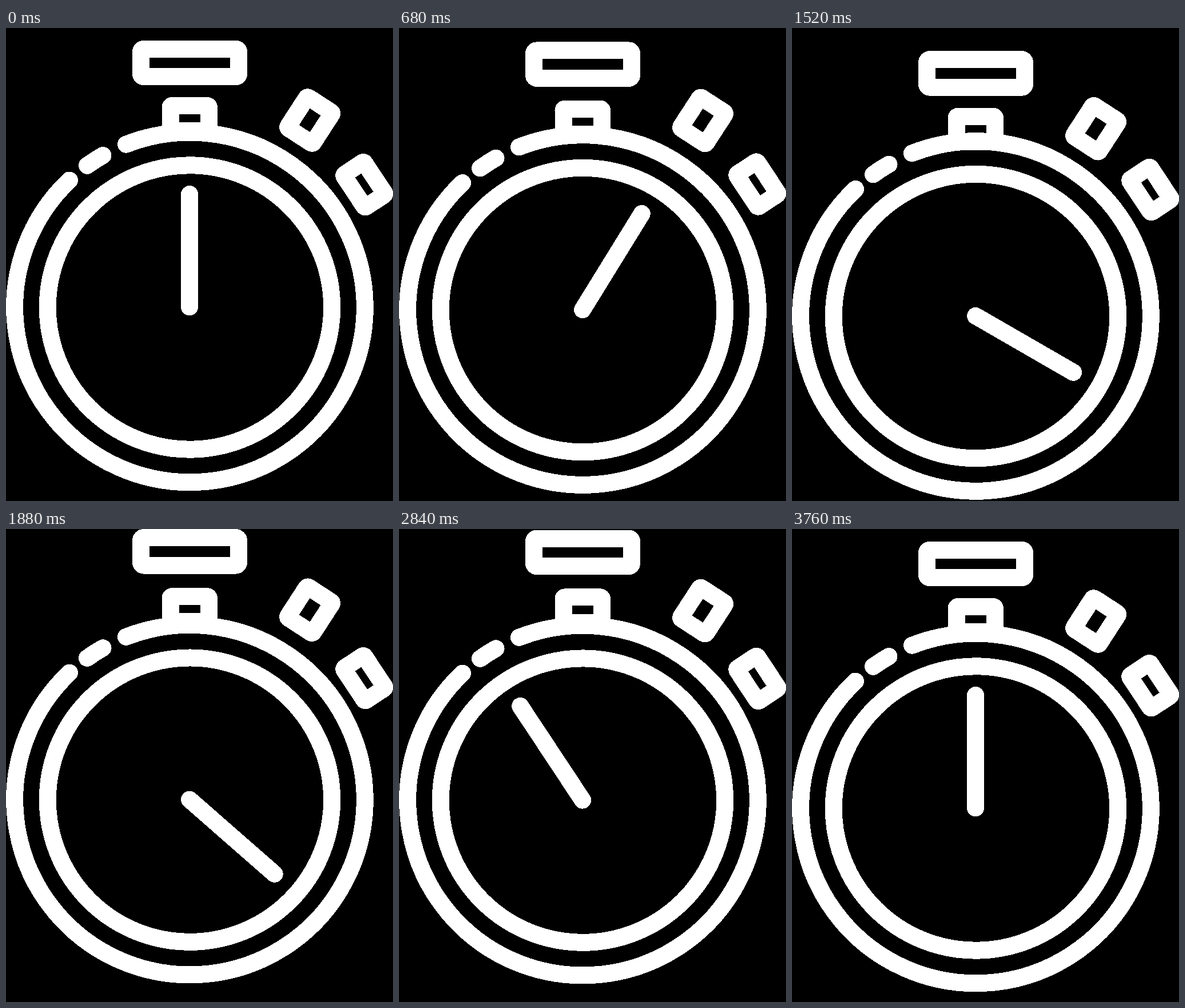
Write an HTML page that moves like this. It is 677 px wide and 828 px high and loops after 5040 ms.

```html
<!DOCTYPE html>
<html lang="en">
<head>
<meta charset="utf-8">
<title>Stopwatch</title>
<style>
  html, body { margin: 0; width: 100%; height: 100%; overflow: hidden; background: #000; }
  svg { display: block; width: 100%; height: 100%; fill: none; stroke: #fff; stroke-width: 30; stroke-linecap: round; stroke-linejoin: round; shape-rendering: crispEdges; }
</style>
</head>
<body>
<svg viewBox="0 0 677 828">
  <rect id="crown" x="236" y="36.75" width="171" height="48.5" rx="5"/>
  <rect id="neck" x="287.5" y="136" width="67.5" height="44.2" rx="3"/>
  <g id="body">
    <path d="M210 203.7A306.3 306.3 0 1 1 111 266.5M142 240.8A306.3 306.3 0 0 1 169.5 223.1"/>
    <circle cx="321.5" cy="489" r="248.7"/>
    <path id="hand" d="M321.1 488.5V291"/>
  </g>
  <g id="sideA"><rect x="-26.3" y="-32.3" width="52.6" height="64.6" rx="3" transform="translate(531.6 161.5) rotate(33)"/></g>
  <g id="sideB"><rect x="-21.4" y="-34.2" width="42.8" height="68.4" rx="3" transform="translate(626.8 274.2) rotate(-33.5)"/></g>
</svg>
<script>
const LOOP = 5040, STEP = 40, BEAT = 480;

// Heights at each beat of the bounce; every part follows with its own gain and lead time
const bounce = [0, 14, -11, 18, -15.5, 12.5, -14.4, 0];
const parts = {
  body:  { gain: 1, lead: 0 },
  neck:  { gain: 1.2, lead: 0 },
  crown: { gain: 1.4, lead: 35 },
  sideA: { gain: 1.28, lead: 55 },
  sideB: { gain: 0.86, lead: 70 }
};

const smooth = u => u * u * (3 - 2 * u);
const el = id => document.getElementById(id);

function lift(t, { gain, lead }) {
  const beat = (t + lead * Math.min(1, t / BEAT)) / BEAT;
  const i = Math.floor(beat);
  if (i >= bounce.length - 1) return 0;
  return gain * (bounce[i] + (bounce[i + 1] - bounce[i]) * smooth(beat - i));
}

// Progress along cubic-bezier(0, 0, 0.163, 1): a quick start and a long slowdown
function flick(t, start, length) {
  const x = Math.min(1, Math.max(0, (t - start) / length));
  let low = 0, high = 1;
  for (let n = 0; n < 24; n++) {
    const u = (low + high) / 2;
    if (3 * 0.163 * u * u * (1 - u) + u ** 3 < x) low = u; else high = u;
  }
  return smooth(high);
}

function draw(now) {
  const t = Math.floor(now % LOOP / STEP) * STEP;
  for (const id in parts)
    el(id).setAttribute("transform", `translate(0 ${lift(t, parts[id])})`);
  const angle = 120 * flick(t, 620, 800) + 240 * flick(t, 1862, 1898);
  el("hand").setAttribute("transform", `rotate(${angle} 321.1 488.5)`);
}

function tick(now) {
  draw(now);
  requestAnimationFrame(tick);
}
draw(0);
requestAnimationFrame(tick);
</script>
</body>
</html>
```
